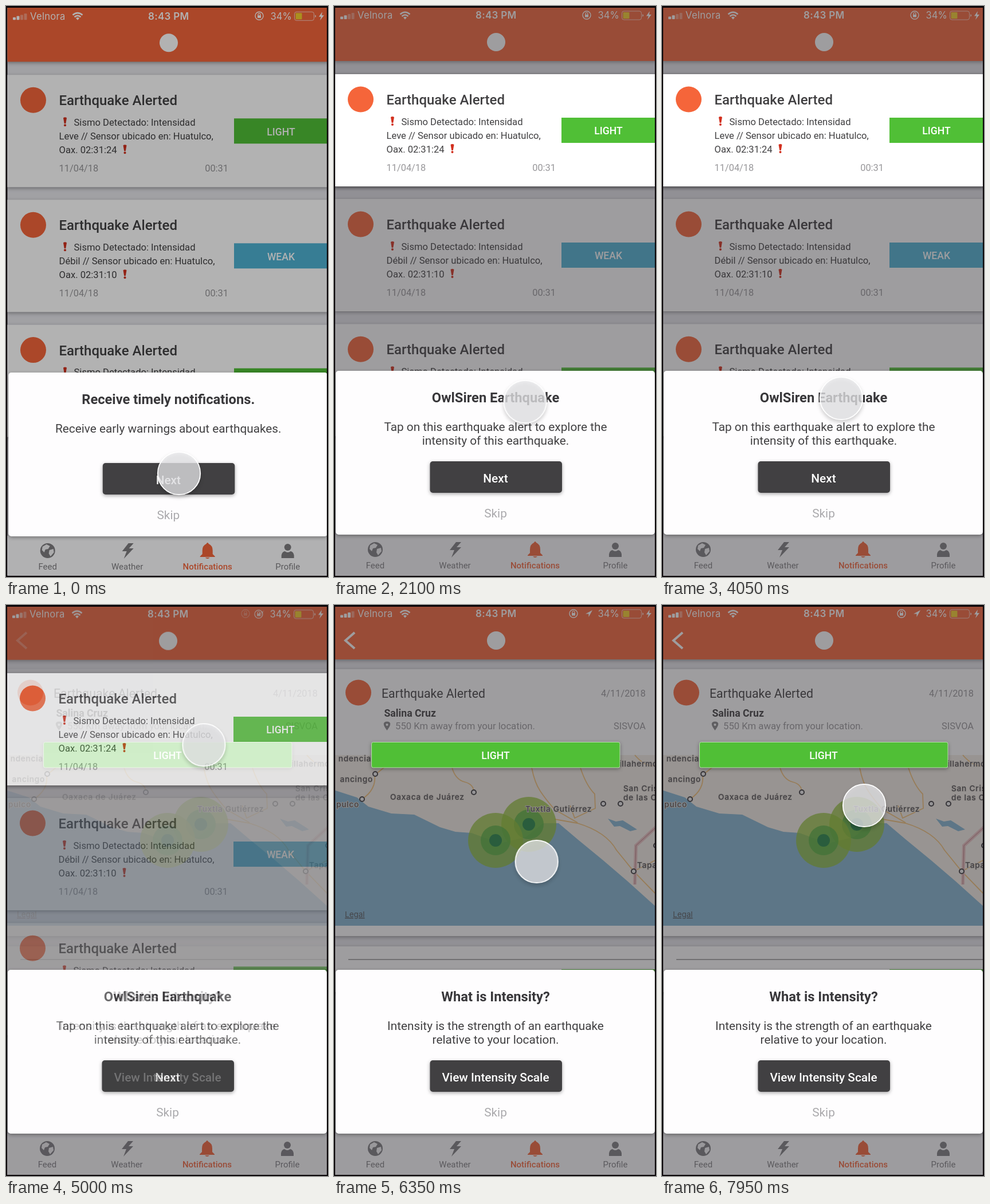
Recreate the animation shown at these times as an HTML page. Size 562 by 997 pixels, loop 8 s.

```html
<!DOCTYPE html>
<html lang="en">
<head>
<meta charset="utf-8">
<title>Earthquake alert tour</title>
<style>
  html, body { margin: 0; width: 100%; height: 100%; overflow: hidden; background: #0a0608; }
  svg { display: block; width: 100%; height: 100%; font-family: Roboto, sans-serif; }
  .status, .place { font-family: Inter, sans-serif; }
  .place { font-size: 13.6px; font-weight: 500; letter-spacing: .8px; fill: #4b484b; stroke: #ddd8cf; stroke-width: 2px; paint-order: stroke; }
  .paper { filter: drop-shadow(0 2px 3px rgba(0, 0, 0, .35)); }
  .road { fill: none; stroke: #f1c078; stroke-width: 1.8; }

  #list { animation: list 8s linear infinite; }
  #detail { animation: detail 8s linear infinite; }
  #touch { animation: touch 8s ease-in-out infinite; filter: drop-shadow(0 4px 3px rgba(0, 0, 0, .22)); }

  @keyframes list { 0%, 15% { opacity: 0 } 16.9%, 100% { opacity: 1 } }
  @keyframes detail { 0%, 62% { opacity: 0 } 63.9%, 100% { opacity: 1 } }
  @keyframes touch {
    0%, 17% { transform: translate(302px, 816px); animation-timing-function: ease-in }
    26.25% { transform: translate(333px, 692px); animation-timing-function: ease-out }
    35.2%, 38% { transform: translate(526px, 244px) }
    49.5%, 51.5% { transform: translate(313px, 685px) }
    59%, 61% { transform: translate(345px, 235px) }
    70%, 76% { transform: translate(352px, 397px) }
    88.5%, 91% { transform: translate(363px, 731px) }
    99%, 100% { transform: translate(353px, 350px) }
  }
</style>
</head>
<body>
<svg viewBox="0 0 562 997" preserveAspectRatio="none"></svg>
<script>
const INK = '#414042', GREY = '#98979a', ORANGE = '#f5653a', GREEN = '#50bf36', BLUE = '#4fb3d4';

const text = (x, y, size, fill, str, extra = '') =>
  `<text x="${x}" y="${y}" font-size="${size}" fill="${fill}" ${extra}>${str}</text>`;
const mid = (x, y, size, fill, str, weight = 400) =>
  text(x, y, size, fill, str, `text-anchor="middle" font-weight="${weight}"`);
const end = (x, y, size, fill, str) => text(x, y, size, fill, str, 'text-anchor="end"');
const rect = (x, y, w, h, fill, extra = '') =>
  `<rect x="${x}" y="${y}" width="${w}" height="${h}" fill="${fill}" ${extra}/>`;
const circle = (x, y, r, fill, extra = '') =>
  `<circle cx="${x}" cy="${y}" r="${r}" fill="${fill}" ${extra}/>`;
const path = (d, fill, extra = '') => `<path d="${d}" fill="${fill}" ${extra}/>`;
const line = (d, width, stroke = '#fff') =>
  path(d, 'none', `stroke="${stroke}" stroke-width="${width}"`);
const move = (x, y, body) => `<g transform="translate(${x} ${y})">${body}</g>`;

const bang = (x, y) => move(x, y,
  path('M-3-7Q0-9 3-7L1.3 3H-1.3Z', '#d2301e') + circle(0, 6, 2, '#d2301e'));

function header(bars, located) {
  const lockX = located ? 418 : 441;
  const signal = [0, 1, 2, 3].map(i =>
    rect(11 + i * 6.5, 18.5 - i * 2.2, 5, 4.5 + i * 2.2, '#fff', `rx="1" opacity="${i < bars ? 1 : .35}"`)).join('');
  const lock = circle(lockX, 16, 7, 'none', 'stroke="#fff" stroke-width="1.4"')
    + rect(lockX - 3, 15, 6, 4.5, '#fff')
    + line(`M${lockX - 2} 15v-1.5a2 2 0 0 1 4 0V15`, 1.2);
  const wifi = line('M115.5 14.5Q124 7 132.5 14.5', 2.6)
    + line('M118.5 18Q124 13 129.5 18', 2.6) + path('M121 20Q124 17.5 127 20L124 23.5Z', '#fff');
  const battery = rect(502.5, 9, 34, 15, 'none', 'rx="3.5" stroke="#fff" stroke-opacity=".65"')
    + rect(504.5, 11, 11, 11, '#f4cd2d', 'rx="1"') + path('M538.5 14q3 2.5 0 5z', '#fff')
    + path('M551 9l-6 8.5h4L547 24l7-9h-4z', '#fff');
  return rect(0, -4, 562, 100, ORANGE, 'class="paper"')
    + `<g class="status">${text(41, 22.3, 16.6, '#fff', 'Velnora', 'letter-spacing=".3"')}
      ${text(247, 22.3, 17, '#fff', '8:43 PM', 'font-weight="600" letter-spacing=".3"')}
      ${text(460.5, 22.3, 16.6, '#fff', '34%')}</g>`
    + signal + wifi + lock + battery
    + (located ? path('M451 10l-12 6.5h5.5V22z', '#fff') : '')
    + circle(283, 63, 16, '#fff');
}

function card(y, level, color, word, time) {
  return move(0, y,
    rect(0, 0, 562, 196, '#fff', 'class="paper"')
    + circle(46.5, 44, 22.5, ORANGE)
    + text(91.5, 53, 24, INK, 'Earthquake Alerted', 'font-weight="500"')
    + bang(102, 82)
    + text(117.5, 88.5, 16.6, INK, 'Sismo Detectado: Intensidad')
    + text(91.5, 112.5, 16.6, INK, `${word} // Sensor ubicado en: Huatulco,`)
    + text(91.5, 137, 16.6, INK, `Oax. ${time}`)
    + bang(206.5, 130)
    + text(91.5, 169, 16.4, GREY, '11/04/18')
    + end(387, 169, 16.4, GREY, '00:31')
    + rect(397, 76, 165, 44, color)
    + mid(479, 105.3, 17.6, '#fff', level, 500));
}

const alerted = () => card(119, 'LIGHT', GREEN, 'Leve', '02:31:24');
const list = () => rect(0, 0, 562, 997, '#e6e6eb') + alerted()
  + card(337, 'WEAK', BLUE, 'Débil', '02:31:10')
  + card(555.3, 'LIGHT', GREEN, 'Leve', '02:31:02')
  + header(2, false);

function nav() {
  const icon = '#7f7e81';
  const globe = circle(72, 949, 13, icon)
    + path('M63 942l7-4 6 3-3 5-5 1-2 5-4-4zM75 948l7-2 1 6-6 7-3-5z', '#f4f4f6');
  const bolt = path('M213 936h9l-8 9h8l-17 18 5-13h-8z', icon);
  const bell = path('M349 937q2-4 4 0 7 3 7 12v6l4 4v1h-26v-1l4-4v-6q0-9 7-12zM347 961h8q-4 4-8 0z', ORANGE);
  const person = circle(491, 943, 6, icon) + path('M480 962v-5q1-6 6-7 5 4 10 0 5 1 6 7v5z', icon);
  return rect(0, 923, 562, 76, '#fdfdff') + globe + bolt + bell + person
    + mid(72, 982, 15, icon, 'Feed') + mid(211, 982, 15, icon, 'Weather')
    + mid(351, 982, 15, ORANGE, 'Notifications', 500) + mid(491, 982, 15, icon, 'Profile');
}

function dialog(title, lines, button) {
  return rect(3, 637, 557, 286, '#fefdfe', 'rx="5" class="paper"')
    + mid(282, 692, 23.7, '#38373a', title, 700)
    + lines.map((str, i) => mid(282, 742 + i * 24, 20.8, INK, str)).join('')
    + rect(167.5, 795, 230.5, 55, INK, 'rx="5" class="paper"')
    + mid(282, 832, 20.8, '#fff', button, 500)
    + mid(282, 893, 20.8, '#aaa9ac', 'Skip');
}

function map() {
  const quake = (x, y) => circle(x, y, 48, '#8fc02f', 'opacity=".75"')
    + circle(x, y, 26, '#4fae3b', 'opacity=".75"') + circle(x, y, 11, '#238545');
  const town = (x, y) => circle(x, y, 4, '#eee', 'stroke="#3d3b3e" stroke-width="2"');
  const place = (x, y, name, anchor = 'start') =>
    `<text class="place" x="${x}" y="${y}" text-anchor="${anchor}">${name}</text>`;
  const roads = ['M49 339Q74 322 71 297L92 280', 'M206 284Q212 305 228 309T244 327',
    'M345 284Q350 310 360 325T385 357L425 380', 'M430 284Q440 315 455 330L456 355 420 372 412 350',
    'M385 374L425 381Q475 396 493 428L523 465 562 505', 'M525 262Q545 285 562 280', 'M562 445L523 465']
    .map(d => `<path class="road" d="${d}"/>`).join('');
  return rect(0, 262, 562, 298, '#f3eee5')
    + path('M0 323L40 336 60 352 100 364 140 366 185 388 212 396 240 398 290 416 335 405 365 381 392 381 425 409 470 446 512 482 562 527V560H0Z', '#84b4d0')
    + path('M478 373l14 5 12-2 25 16-12 3-18-9-10 1z', '#84b4d0')
    + roads + line('M562 388L527 420 525 488', 6, '#e7c0c0') + line('M562 388L527 420 525 488', 1, '#b77c80')
    + place(65, 273, 'ndencia', 'end') + place(68, 309, 'ancingo', 'end') + place(44, 353, 'pulco', 'end')
    + place(98, 340, 'Oaxaca de Juárez')
    + place(498, 282, 'illahermosa') + place(505, 325, 'San Cristóbal')
    + place(505, 341, 'de las Casas') + place(529, 459, 'Tapachula')
    + [[72, 295], [49, 339], [244, 327], [470, 347], [500, 347], [523, 465], [562, 420]].map(p => town(...p)).join('')
    + quake(340, 383) + quake(282, 411) + place(334, 361, 'Tuxtla Gutiérrez')
    + text(19, 545, 13.5, '#55575a', 'Legal', 'class="status" text-decoration="underline"');
}

function detail() {
  return rect(0, 0, 562, 997, '#e6e6eb')
    + rect(0, 112, 562, 466, '#fff', 'class="paper"')
    + circle(42.5, 153, 22.5, ORANGE)
    + text(83, 162, 21.3, INK, 'Earthquake Alerted')
    + end(544, 160, 16.4, GREY, '4/11/2018')
    + text(87.5, 195, 17.7, INK, 'Salina Cruz', 'font-weight="700"')
    + path('M92.5 219Q81 204 92.5 203.5 104 204 92.5 219Z', '#88878a') + circle(92.5, 209, 2, '#fff')
    + text(107, 217, 16.7, GREY, '550 Km away from your location.')
    + end(544, 217, 16.4, GREY, 'SISVOA')
    + map()
    + rect(0, 596, 562, 80, '#fff', 'class="paper"')
    + rect(25, 618.5, 537, 1, '#555')
    + rect(397, 636, 165, 10, GREEN)
    + move(0, -1, header(3, true))
    + line('M36 48L20 62 36 76', 4);
}

const shade = color => rect(0, 0, 562, 997, color);
const DIM = 'rgba(50,47,52,.47)';
const button = rect(65.5, 239.5, 433.5, 44.5, GREEN, 'rx="3" stroke="#b9dfaf" class="paper"')
  + mid(282, 269.3, 17.6, '#fff', 'LIGHT', 500);

document.querySelector('svg').innerHTML = `
  <clipPath id="screen">${rect(2.5, 3, 557.5, 991.5, '#000')}</clipPath>
  <g clip-path="url(#screen)">
    <g>${move(1, 1.3, list())}${move(.7, 2, nav())}${shade('rgba(0,0,0,.3)')}
      ${move(1.3, 3, dialog('Receive timely notifications.', ['Receive early warnings about earthquakes.'], 'Next'))}</g>
    <g id="list">${list()}${nav()}${shade(DIM)}${alerted()}
      ${dialog('OwlSiren Earthquake', ['Tap on this earthquake alert to explore the', 'intensity of this earthquake.'], 'Next')}</g>
    <g id="detail">${detail()}${nav()}${shade(DIM)}${button}
      ${dialog('What is Intensity?', ['Intensity is the strength of an earthquake', 'relative to your location.'], 'View Intensity Scale')}</g>
  </g>
  <g id="touch">${circle(0, 0, 37.2, 'rgba(232,232,234,.76)', 'stroke="#fff" stroke-width="1.8"')}</g>`;
</script>
</body>
</html>
```
